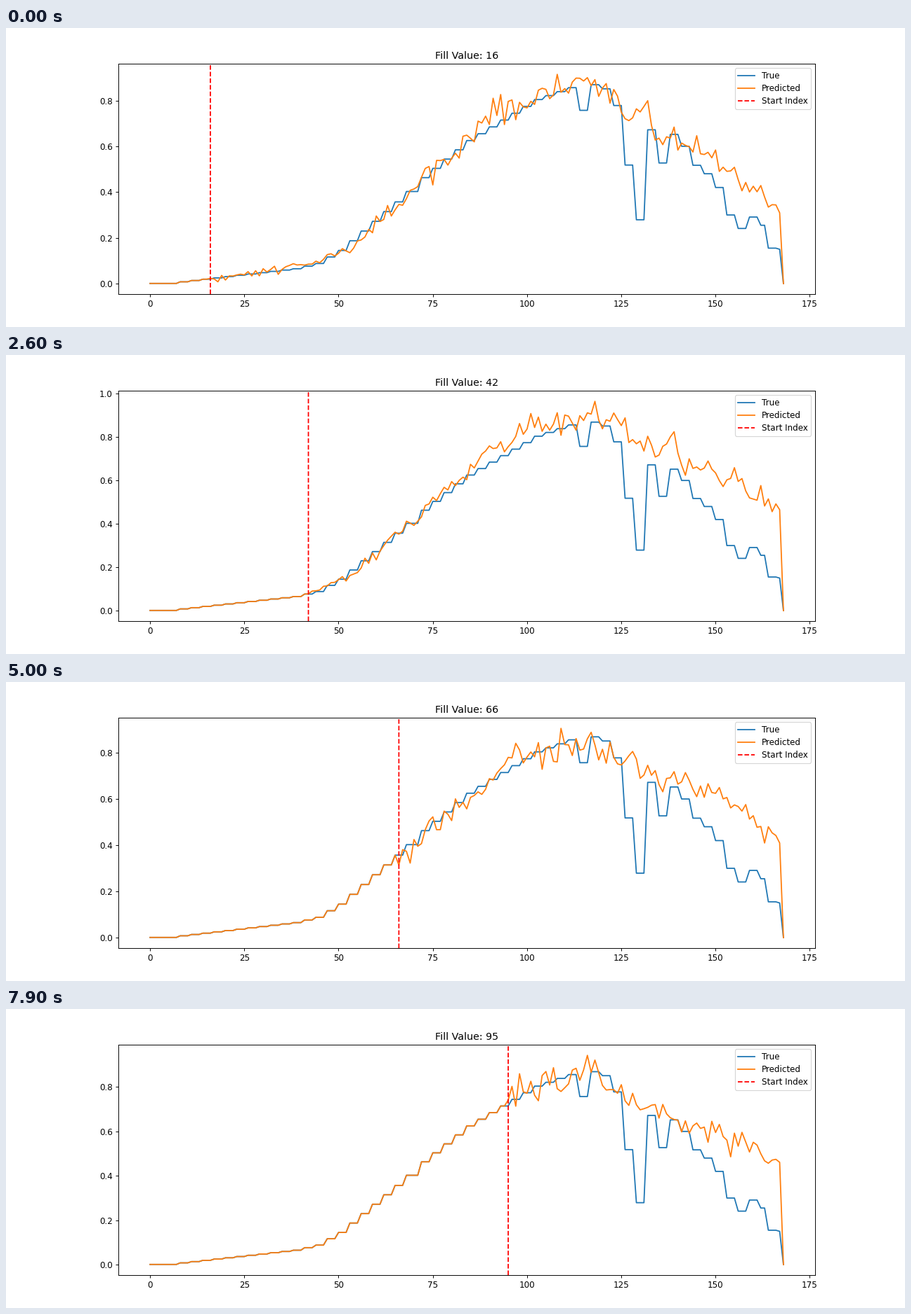
Animation, 1280 px wide and 427 px high, one loop 8 s. Source, as a matplotlib script:

```python
import numpy as np
import matplotlib.pyplot as plt
from matplotlib.animation import FuncAnimation

DPI = 85.3334
FIRST, COUNT, STEP_MS = 16, 80, 100
X = np.arange(169)

# Steady climb, then the levels held while the series dips and falls.
CLIMB = [(0, .001), (8, .008), (38, .065), (44, .088), (50, .145),
         (65, .357), (72, .463), (84, .625), (102, .804), (111, .856)]
FALL = [.757, .869, .851, .778, .518, .279, .672, .527, .652, .600,
        .517, .480, .420, .300, .241, .291, .255, .155, .150, 0]
# Average shape of the forecast.
TREND = [(16, .02), (45, .09), (55, .18), (75, .49), (97, .82), (117, .88),
         (140, .70), (155, .60), (167, .46), (168, .45)]


def through(points, x):
    return np.interp(x, *zip(*points))


def stairs():
    """Levels sampled from the climb and the fall, mostly held for 3 steps."""
    climb_edges = [0, *range(8, 69, 3), *range(72, 112, 3)]
    fall_edges = [*range(114, 163, 3), 164, 167, 168]
    levels = [*through(CLIMB, climb_edges), *FALL]
    return np.repeat(levels, np.diff(climb_edges + fall_edges + [X.size]))


def predict(start):
    """True values before the start index, a noisy forecast after it."""
    rng = np.random.default_rng(start)
    # An early start makes the forecast sink further at the end.
    sag = .15 * np.exp((FIRST - start) / 12) * np.clip((X - 120) / 47, 0, 1)
    trend = through(TREND, X) - sag
    noisy = trend + rng.normal(size=X.size) * (.008 + .038 * trend)
    # The summit swings slowly as the start index advances.
    summit = .935 + .03 * np.cos(2 * np.pi * (start / 43 - 1))
    noisy = noisy.clip(0) * summit / noisy.max()
    noisy[-1] = 0
    return np.where(X < start, TRUE, noisy)


TRUE = stairs()

fig, ax = plt.subplots(figsize=(15, 5.004), dpi=DPI)
ax.plot(X, TRUE, color="tab:blue", label="True")
forecast, = ax.plot(X, TRUE, color="tab:orange", label="Predicted")
marker = ax.axvline(FIRST, color="red", linestyle="--", label="Start Index",
                    snap=False)
title = ax.set_title("")
ax.set_xlim(-8.4, 176.4)
ax.legend(loc="upper right", labelspacing=.42)


def draw(i):
    start = FIRST + i
    values = predict(start)
    forecast.set_ydata(values)
    marker.set_xdata([start, start])
    title.set_text(f"Fill Value: {start}")
    top = values.max()
    ax.set_ylim(-.05 * top, 1.05 * top)
    return forecast, marker, title


anim = FuncAnimation(fig, draw, frames=COUNT, interval=STEP_MS,
                     init_func=lambda: draw(0), repeat=True, repeat_delay=0)
plt.show()
```
